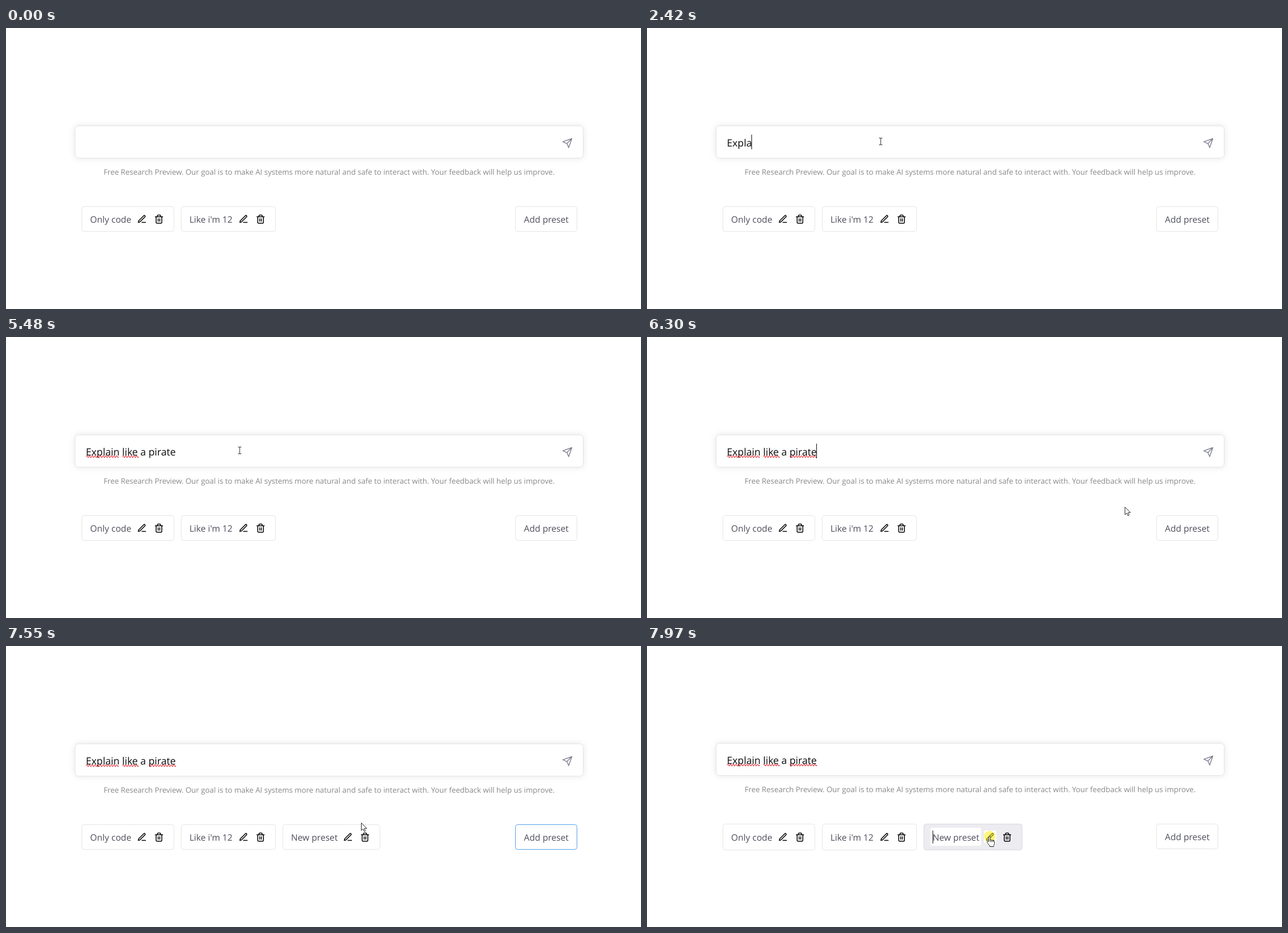
Recreate the animation shown at these times as an HTML page. Size 1125 by 498 pixels, loop 8 s.

```html
<!DOCTYPE html>
<html lang="en">
<head>
<meta charset="utf-8">
<title>Preset prompt</title>
<style>
  html, body { margin: 0; width: 100%; height: 100%; overflow: hidden; background: #fff; }
  svg { display: block; width: 1125px; height: 498px; }
  text { font-family: "Open Sans", "Noto Sans", sans-serif; text-rendering: geometricPrecision; }
  .prompt { font-size: 17.7px; fill: #0c0c0c; }
  .label { font-size: 15.65px; fill: #4d4e5c; }
  .note { font-size: 13.34px; fill: #888; text-anchor: middle; }
  .field { fill: #fff; stroke: #e4e4e4; filter: drop-shadow(0 0 5.5px rgba(0, 0, 0, .1)); }
  .icon { fill: none; stroke: #000; stroke-width: 2.1; stroke-linecap: round; stroke-linejoin: round; }
  .send { stroke: #7f8091; stroke-width: 1.8; }
  .squiggle { fill: none; stroke: #e8303a; stroke-width: 1.1; }
  .pointer { fill: #fff; stroke: #222; stroke-linejoin: round; }
</style>
</head>
<body>
<svg id="stage" viewBox="0 0 1125 498"></svg>
<script>
const LOOP = 8000;
const stage = document.getElementById('stage');

const PROMPT = 'Explain like a pirate';
const KEY_TIMES = [1620, 1880, 2080, 2280, 2420, 2480, 2600, 2700, 2880, 3230, 3430,
  3500, 3620, 3830, 3960, 4160, 4490, 4600, 4700, 4810, 4950];
const MISSPELT = [['Explain', 2800], ['like', 3700], ['pirate', 6010]];
const BLINK = 530, FOCUS = 890, PRESS = 6750, ADDED = 6890, PEN_PRESS = 7830, EDIT = 7900;
const CLICKS = [[FOCUS, 950], [PRESS, 6950], [PEN_PRESS, LOOP]];

const ICONS = {
  send: 'M22 2 11 13M22 2l-7 20-4-9-9-4z',
  pen: 'M12 20h9M16.5 3.5a2.12 2.12 0 0 1 3 3L7 19l-4 1 1-4z',
  trash: 'M3 6h18M19 6v14a2 2 0 0 1-2 2H7a2 2 0 0 1-2-2V6M8 6V4a2 2 0 0 1 2-2h4a2 2 0 0 1 2 2v2M10 11v6M14 11v6'
};
const POINTERS = {
  arrow: 'M0 0V13.5L3.1 10.6 5.2 15.3 7.3 14.4 5.3 9.8H9.6Z',
  beam: 'M-3-6H-1Q0-6 0-5 0-6 1-6H3M0-5V5M-3 6H-1Q0 6 0 5 0 6 1 6H3',
  hand: 'M-1.3 9V1a1.3 1.3 0 0 1 2.6 0V6.5q1.5-1 2.5.4 1.6-.7 2.5.6 2-.4 2.2 1.4V13q-.3 2-1.5 3.2V18H.3V16.5' +
    'Q-3 13-4.6 10.2-4.6 8-2.8 8.6ZM1.3 6.5V10M3.8 7V10M6.3 7.6V10'
};

// Pointer positions, one per step, on a smoothed straight line.
const glide = ([ax, ay], [bx, by], n) => Array.from({ length: n }, (_, i) => {
  const u = (i + 1) / n, e = u * u * (3 - 2 * u);
  return [ax + (bx - ax) * e, ay + (by - ay) * e];
});
const MOVES = [
  { at: 260, step: 69, points: glide([1008, 418], [414, 201], 9) },
  { at: 5700, step: 72.7, points: glide([414, 201], [927, 320], 12) },
  { at: 7280, step: 67, points: [[880, 318], [800, 313], [720, 309], [665, 309],
    [629.5, 313.5], [612, 323], [607, 333], [607, 337.5]] }
];

function pointerAt(t) {
  const move = MOVES.filter(m => t >= m.at).pop();
  return move && move.points[Math.min(Math.floor((t - move.at) / move.step), move.points.length - 1)];
}

const ruler = document.createElement('canvas').getContext('2d');
function promptWidth(s) {
  ruler.font = '17.7px "Open Sans", "Noto Sans", sans-serif';
  return ruler.measureText(s).width;
}

const text = (kind, x, y, s) => `<text class="${kind}" x="${x}" y="${y}">${s}</text>`;
const rect = (l, t, r, b, rx, attrs) =>
  `<rect x="${l}" y="${t}" width="${r - l}" height="${b - t}" rx="${rx}" ${attrs}/>`;
const caret = (x, top, bottom) => `<path d="M${x} ${top}V${bottom}" stroke="#111"/>`;
const icon = (name, cx, cy, scale) =>
  `<path class="icon ${name}" d="${ICONS[name]}" transform="translate(${cx} ${cy}) scale(${scale}) translate(-12 -12)"/>`;
const inside = (p, l, t, r, b) => p && p[0] > l && p[0] < r && p[1] > t && p[1] < b;

function squiggle(word) {
  const x = 142 + promptWidth(PROMPT.slice(0, PROMPT.indexOf(word)));
  return `<path class="squiggle" d="M${x} 212${'q1.2-3 2.4 0t2.4 0'.repeat(Math.round(promptWidth(word) / 4.8))}"/>`;
}

function promptField(t) {
  const typed = PROMPT.slice(0, KEY_TIMES.filter(k => t >= k).length);
  const awake = KEY_TIMES.filter(k => t >= k).pop() || FOCUS;
  const lit = t >= FOCUS && t < PRESS && Math.floor((t - awake) / BLINK) % 2 === 0;
  return rect(122.5, 173.5, 1022.5, 230.5, 6, 'class="field"') +
    text('prompt', 141.5, 210, typed) +
    MISSPELT.filter(([, at]) => t >= at).map(([word]) => squiggle(word)).join('') +
    (lit ? caret(Math.round(141 + promptWidth(typed)) + .5, 189, 215) : '') +
    icon('send', 994.5, 204, .8) +
    text('note', 572.5, 260, 'Free Research Preview. Our goal is to make AI systems more natural ' +
      'and safe to interact with. Your feedback will help us improve.');
}

function addButton(t, p) {
  const focused = t >= PRESS && t < PEN_PRESS;
  const fill = inside(p, 902, 316, 1012, 361) ? '#ececf1' : '#fff';
  return rect(902.5, 316.5, 1011.5, 360.5, 4, `fill="${fill}" stroke="${focused ? '#55a0ee' : '#e5e5e5'}"`) +
    text('label', 917.5, 345, 'Add preset');
}

function preset(label, left, right, grow, p, editing) {
  const hover = inside(p, left, 316, right, 361);
  const colors = hover ? 'fill="#ececf1" stroke="#d9d9e3"' : 'fill="#fff" stroke="#e5e5e5"';
  return rect(left, 316.5 - grow, right, 360.5 + grow, 4, colors) +
    (editing ? rect(502, 322, 592, 354, 4, 'fill="#fff"') + rect(597, 327, 619, 350, 3, 'fill="#fff"') : '') +
    text('label', left + (editing ? 15.5 : 14.5), 345, label) +
    (editing ? caret(506.5, 327, 350) : '') +
    icon('pen', right - 56.7, 338.8, .72) + icon('trash', right - 26.5, 338.8, .72);
}

function pointer(t, p) {
  if (!p) return '';
  const overField = inside(p, 122, 173, 1023, 231) || inside(p, 173, 246, 972, 265);
  const overButton = inside(p, 902, 316, 1012, 361) || (t >= ADDED && inside(p, 490, 316, 663, 361));
  const kind = overField ? 'beam' : overButton ? 'hand' : 'arrow';
  const clicked = CLICKS.some(([from, to]) => t >= from && t < to);
  return (clicked ? `<circle cx="${p[0]}" cy="${p[1]}" r="10" fill="#fff000" opacity=".52"/>` : '') +
    `<path class="pointer" d="${POINTERS[kind]}" transform="translate(${p[0]} ${p[1]})"/>`;
}

function scene(t) {
  const p = pointerAt(t), editing = t >= EDIT, grow = editing ? 1 : 0;
  return `<g transform="translate(0 ${-grow})">${promptField(t)}${addButton(t, p)}</g>` +
    preset('Only code', 134.5, 297.5, grow, p) +
    preset("Like i'm 12", 310.5, 477.5, grow, p) +
    (t >= ADDED ? preset('New preset', 490.5, editing ? 664.5 : 662.5, grow, p, editing) : '') +
    pointer(t, p);
}

let shown = '';
const start = performance.now();
function frame() {
  const next = scene((performance.now() - start) % LOOP);
  if (next !== shown) stage.innerHTML = shown = next;
  requestAnimationFrame(frame);
}
frame();
</script>
</body>
</html>
```
